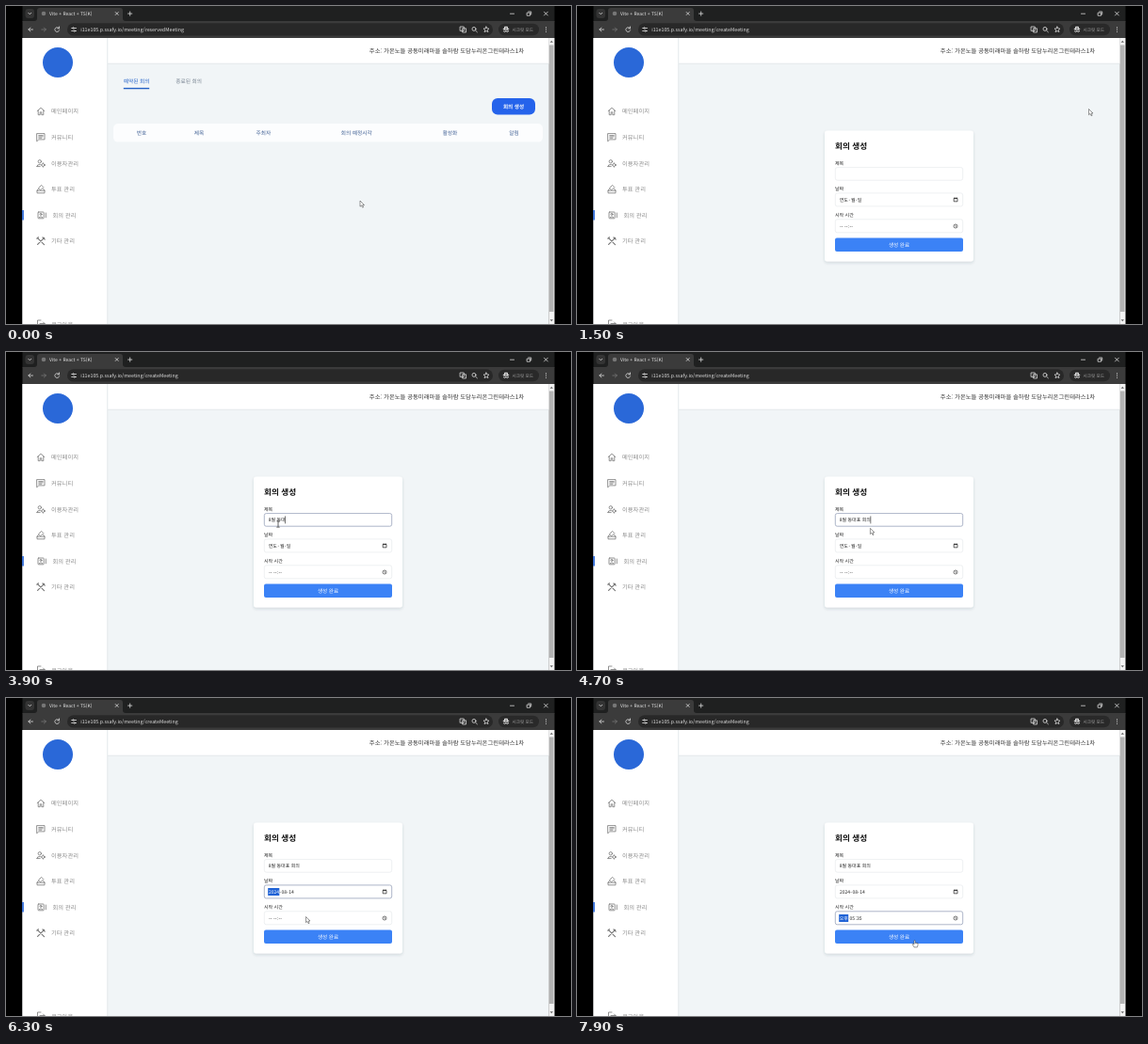
These frames come from a looping animation (600 px wide and 338 px high, 8000 ms). An HTML page:

```html
<!DOCTYPE html>
<html lang="ko">
<head>
<meta charset="utf-8">
<title>회의 생성</title>
<style>
  html, body { margin: 0; width: 100%; height: 100%; overflow: hidden; background: #000; }
  svg { display: block; width: 100vw; height: 100vh; }
  text {
    font-family: "Noto Sans CJK KR", "Noto Sans CJK", "Noto Sans", sans-serif;
    text-rendering: geometricPrecision;
    white-space: pre;
  }
  .icon { fill: none; stroke-width: .8; stroke-linecap: round; stroke-linejoin: round; }
  .chrome { stroke: #dcdcdc; }
  .menu { font-size: 6.3px; fill: #8c8c8c; }
  .menu .icon { stroke: #777; }
  .head { font-size: 5.7px; font-weight: 500; fill: #3f5f94; text-anchor: middle; }
  .field { font-size: 5px; fill: #222; }
  .box { fill: #fff; stroke: #e3e6ea; stroke-width: .6; }
  .box.focus { stroke: #98a3ba; stroke-width: .8; }
  .pointer { fill: #fff; stroke: #333; stroke-width: .5; stroke-linejoin: round; }
</style>
</head>
<body>
<svg viewBox="0 0 600 338" preserveAspectRatio="none">
  <defs>
    <filter id="shadow" x="-10%" y="-10%" width="120%" height="125%">
      <feDropShadow dx="0" dy="1.5" stdDeviation="1.8" flood-color="#304050" flood-opacity=".16"/>
    </filter>
  </defs>
  <rect width="600" height="338"/>

  <!-- browser window -->
  <rect x="17.5" width="565" height="17" fill="#1f2020"/>
  <rect x="17.5" y="16" width="565" height="18" fill="#3b3b3b"/>
  <path d="M30 16Q33 16 33 13V5Q33 2 36 2H121Q124 2 124 5V13Q124 16 127 16Z" fill="#3b3b3b"/>
  <rect x="20.5" y="3" width="9.5" height="10" rx="3" fill="#343434"/>
  <circle cx="40" cy="8" r="2.3" fill="#777"/>
  <text x="46" y="9.9" font-size="5" fill="#e3e3e3">Vite + React + TS(K)</text>
  <rect x="65" y="18.2" width="452" height="13.4" rx="6.7" fill="#282828"/>
  <rect x="523" y="18.8" width="43" height="12.4" rx="6.2" fill="#292929"/>
  <text id="url" x="79.2" y="26.8" font-size="5.3" fill="#dedede"></text>
  <text x="537.5" y="26.7" font-size="4.6" fill="#a9a9a9">시크릿 모드</text>
  <g class="icon chrome">
    <path d="M23.8 7.3l1.5 1.5 1.5-1.5M116.2 6.5l3 3m0-3l-3 3M131.7 6v4.2m-2.1-2.1h4.2"/>
    <path d="M535.5 8.2h4M571.5 6.2l3.8 3.8m0-3.8l-3.8 3.8M553.5 7.2h3v3h-3zM554.7 6h3v3"/>
    <path d="M28.5 25h-4.6m2-2l-2 2 2 2M56.2 23.6a2.4 2.4 0 1 0 .4 2.2M56.5 22v1.8h-1.8"/>
    <path d="M37.8 25h4.6m-2-2l2 2-2 2" stroke="#777"/>
    <path d="M69.7 23.5h1m1.8 0h2M69.7 26.5h2.2m1.8 0h.8"/>
    <circle cx="71.5" cy="23.5" r=".8"/><circle cx="72.8" cy="26.5" r=".8"/>
    <rect x="482.5" y="22" width="3.8" height="4.4"/><rect x="485" y="23.8" width="3.5" height="4.2"/>
    <circle cx="497" cy="24.4" r="2"/><path d="M498.6 26l1.8 1.8"/>
    <path d="M510 22l.9 1.9 2 .2-1.5 1.4.5 2.1-1.9-1.1-1.9 1.1.5-2.1-1.5-1.4 2-.2Z"/>
    <path d="M528.3 24.4h5.4M529.6 24v-1.6h2.8V24" stroke-width="1.1"/>
    <circle cx="529.6" cy="26.6" r="1"/><circle cx="532.4" cy="26.6" r="1"/>
    <path d="M573.5 22.8v.1M573.5 25v.1M573.5 27.2v.1" stroke-width="1.1"/>
  </g>

  <!-- page frame -->
  <rect x="17.5" y="34" width="559" height="304" fill="#f1f5f7"/>
  <rect x="17.5" y="34" width="90" height="304" fill="#fff"/>
  <rect x="108" y="34" width="468.5" height="27" fill="#fff"/>
  <path d="M107.8 34V338M108 61.2H576.5" stroke="#dde2e5" stroke-width=".7"/>
  <rect x="576.3" y="34" width="6.2" height="304" fill="#f3f3f3"/>
  <rect x="576.9" y="41.5" width="4.6" height="283.5" fill="#b2b2b2"/>
  <path d="M577.6 38.8l1.7-2 1.7 2ZM577.6 333.2l1.7 2 1.7-2Z" fill="#666"/>
  <circle cx="55" cy="60" r="16" fill="#2a68d8"/>
  <text x="550" y="49.9" font-size="6.35" fill="#333" text-anchor="end">주소: 가온노들 공동미래마을 솔하람 도담누리온그린테라스1차</text>

  <g class="menu">
    <rect x="17.2" y="217" width="1.6" height="10.5" fill="#1d5fd8"/>
    <text x="48" y="114.4">메인페이지</text>
    <text x="48" y="142">커뮤니티</text>
    <text x="48" y="169.6">이용자관리</text>
    <text x="48" y="197.2">투표 관리</text>
    <text x="49.5" y="224.8">회의 관리</text>
    <text x="48" y="252.4">기타 관리</text>
    <text x="48" y="340.8">로그아웃</text>
    <g class="icon">
      <path d="M33.2 111.6l3.8-3.4 3.8 3.4M34.2 111v4.7h2v-2.9h1.6v2.9h2V111"/>
      <path d="M33 135.6h8v6.3h-6.2L33 143.6ZM34.8 137.6h4.4m-4.4 1.3h4.4m-4.4 1.3h3"/>
      <circle cx="35.8" cy="165.3" r="1.7"/><path d="M32.8 170.6q0-2.5 3.5-2.2m-3.5 2.2h3.4"/>
      <circle cx="39.4" cy="169" r="1.5"/><path d="M39.4 166.8v.4m0 3.6v.4m-2.2-2.2h.4m3.6 0h.4"/>
      <path d="M34.4 194.4l-1.4 1.8v2.6h8v-2.6l-1.4-1.8M33 196.2h8M34.8 193.2l2.8-2.8 2.2 2.2-2.8 2.8Z"/>
      <rect x="34" y="219" width="6.2" height="6.8" rx=".7"/><circle cx="37" cy="221.4" r="1"/>
      <path d="M35.2 224.6q1.8-1.8 3.6 0M42.3 220v4.8"/>
      <path d="M33.5 246.6l7 7M40.6 246.4l-7 7M39 246l2.2 2.2M32.8 247.2l1.6-1.4" stroke-width="1.2"/>
      <path d="M37 334h-3.5v6M36 337.5h5m-1.5-1.5l1.5 1.5-1.5 1.5"/>
    </g>
  </g>

  <!-- list of meetings -->
  <g id="list">
    <text x="124.8" y="82.2" font-size="5.7" font-weight="500" fill="#2563c9">예약된 회의</text>
    <text x="180.3" y="82.2" font-size="5.7" font-weight="500" fill="#75808f">종료된 회의</text>
    <rect x="124.8" y="86.9" width="27.4" height="1.4" fill="#2460c4"/>
    <rect id="create" x="516" y="98" width="46" height="17.6" rx="6"/>
    <text x="539" y="108.9" font-size="5.6" font-weight="700" fill="#fff" text-anchor="middle">회의 생성</text>
    <rect x="114" y="125" width="456" height="19.6" rx="5" fill="#fcfdfe"/>
    <g class="head">
      <text x="144" y="136.8">번호</text>
      <text x="205" y="136.8">제목</text>
      <text x="273.3" y="136.8">주최자</text>
      <text x="372.3" y="136.8">회의 예정시각</text>
      <text x="471.5" y="136.8">활성화</text>
      <text x="539.5" y="136.8">알림</text>
    </g>
  </g>

  <!-- form -->
  <g id="form">
    <rect x="263" y="132.5" width="158" height="139" rx="3" fill="#fff" filter="url(#shadow)"/>
    <text x="274" y="152.3" font-size="8.6" font-weight="700" fill="#111">회의 생성</text>
    <g class="field">
      <text x="274" y="168.5">제목</text>
      <text x="274" y="196">날짜</text>
      <text x="274" y="223.9">시작 시간</text>
      <rect id="titleBox" class="box" x="274.3" y="171.6" width="135.4" height="13.6" rx="2"/>
      <rect id="dateBox" class="box" x="274.3" y="198.9" width="135.4" height="14" rx="2"/>
      <rect id="timeBox" class="box" x="274.3" y="226.8" width="135.4" height="14" rx="2"/>
      <rect id="mark" x="278.2" height="8" fill="#1f62d6"/>
      <text id="title" x="278.7" y="180.4"></text>
      <text id="date" y="207.9"></text>
      <text id="time" y="235.9"></text>
    </g>
    <rect id="caret" y="174.4" width=".6" height="8" fill="#222"/>
    <path d="M400.2 204.4h3.8v3.4h-3.8ZM400.2 204.6h3.8M401 203.4v.6M403.2 203.4v.6" fill="none" stroke="#222" stroke-width=".7"/>
    <circle cx="402" cy="234" r="2" fill="none" stroke="#222" stroke-width=".6"/>
    <path d="M402 232.8V234.2l.9.5" fill="none" stroke="#222" stroke-width=".5"/>
    <rect x="274" y="246.6" width="136" height="14.4" rx="2" fill="#3b82f6"/>
    <text x="342" y="255.8" font-size="5.6" font-weight="500" fill="#fff" text-anchor="middle">생성 완료</text>
  </g>

  <g id="cursor">
    <path id="arrow" class="pointer" d="M0 0V6.2L1.5 4.9 2.6 7.2 3.6 6.8 2.6 4.5H4.5Z"/>
    <path id="hand" class="pointer" d="M0 .6V4.4L-1 3.7C-1.6 3.4-2 4-1.6 4.5L0 7.4H3.3L4 5.2V3.4C4 2.7 3.2 2.7 3.2 3.4 3.2 2.6 2.2 2.6 2.2 3.2 2.2 2.5 1.2 2.5 1.2 3.1V.6C1.2-.2 0-.2 0 .6Z"/>
    <path id="beam" d="M-1.6-3.2H-.5L0-2.8.5-3.2H1.6M0-2.8V2.8M-1.6 3.2H-.5L0 2.8.5 3.2H1.6" fill="none" stroke="#222" stroke-width=".7"/>
  </g>
</svg>
<script>
const LOOP = 8000, STEP = 100;
const $ = id => document.getElementById(id);
const show = (id, on) => $(id).setAttribute('visibility', on ? 'visible' : 'hidden');
const within = (t, from, to) => t >= from && t < to;

// time, x, y of the pointer
const path = [
  [0, 376, 207], [900, 544, 106], [1000, 544, 109.5], [1500, 543.5, 109.5],
  [2000, 312, 176], [2100, 300.5, 178.5], [2200, 289, 183], [4500, 289, 183],
  [5200, 402, 205], [5300, 402.3, 205], [5400, 395, 210], [5900, 313, 268],
  [6000, 313, 268], [6300, 318.5, 232.5], [6700, 400, 231], [6800, 400, 231],
  [7200, 296, 280], [7400, 298, 278], [7800, 358, 257.5], [8000, 358, 257.5]
];
const shapes = [[0, 'arrow'], [800, 'hand'], [1300, 'arrow'], [2000, 'beam'], [4700, 'arrow'], [7700, 'hand']];

// one composition step of the title per 100 ms
const typeStart = 3100;
const typed = '8|8ㅇ|8우|8워|8월|8월 ㄷ|8월 도|8월 동|8월 동대|8월 동대ㅍ|8월 동대표|8월 동대표 호|8월 동대표 회|8월 동대표 회의'.split('|');

const dateParts = {
  empty: [[278.7, '연도'], [288.5, '-'], [290.9, '월'], [295.8, '-'], [297.7, '일']],
  full: [[278.9, '2024'], [290.3, '-'], [292.4, '08'], [298.1, '-'], [300.2, '14']]
};
const timeParts = {
  empty: [[278.9, '--'], [283.9, '--'], [287.9, ':'], [289.6, '--']],
  full: [[278.7, '오후'], [289.6, '05'], [295.4, ':'], [297, '35']]
};

function pointerAt(t) {
  const i = path.findIndex(p => p[0] > t);
  const [t0, x0, y0] = path[i - 1], [t1, x1, y1] = path[i];
  const k = (t - t0) / (t1 - t0), e = k * k * (3 - 2 * k);
  return [x0 + (x1 - x0) * e, y0 + (y1 - y0) * e];
}

function fill(id, parts, marked) {
  $(id).innerHTML = parts.map(([x, s], i) =>
    `<tspan x="${x}"${marked && !i ? ' fill="#fff"' : ''}>${s}</tspan>`).join('');
}

function draw(t) {
  const onForm = t >= 1300;
  show('list', !onForm);
  $('form').style.display = onForm ? '' : 'none';
  $('url').textContent = 'i11e105.p.ssafy.io/meeting/' + (onForm ? 'createMeeting' : 'reservedMeeting');
  $('create').setAttribute('fill', t >= 800 ? '#1d4ed8' : '#2563eb');

  const focus = t < 2000 ? '' : t < 5200 ? 'title' : t < 6800 ? 'date' : 'time';
  for (const id of ['title', 'date', 'time']) $(id + 'Box').classList.toggle('focus', id === focus);

  const keys = Math.min(typed.length, Math.floor((t - typeStart) / STEP) + 1);
  $('title').textContent = keys > 0 ? typed[keys - 1] : '';
  const dateFull = t >= 6000, timeFull = t >= 7200;
  fill('date', dateFull ? dateParts.full : dateParts.empty, focus === 'date');
  fill('time', timeFull ? timeParts.full : timeParts.empty, focus === 'time');

  const caretOn = within(t, 2000, 2400) || within(t, 2900, 4900);
  show('caret', caretOn);
  if (caretOn) $('caret').setAttribute('x', 278.4 + (keys > 0 ? $('title').getComputedTextLength() : 0));

  $('mark').style.display = focus === 'date' || focus === 'time' ? '' : 'none';
  $('mark').setAttribute('y', focus === 'date' ? 202 : 230);
  $('mark').setAttribute('width', focus === 'date' && dateFull ? 12.1 : focus === 'time' && !timeFull ? 4.6 : 10);

  const shape = shapes.filter(s => s[0] <= t).pop()[1];
  for (const id of ['arrow', 'hand', 'beam']) show(id, id === shape);
  $('cursor').setAttribute('transform', `translate(${pointerAt(t)})`);
}

let start, last;
function tick(now) {
  start ??= now;
  const t = Math.floor((now - start) % LOOP / STEP) * STEP;
  if (t !== last) draw(last = t);
  requestAnimationFrame(tick);
}
draw(0);
requestAnimationFrame(tick);
</script>
</body>
</html>
```
